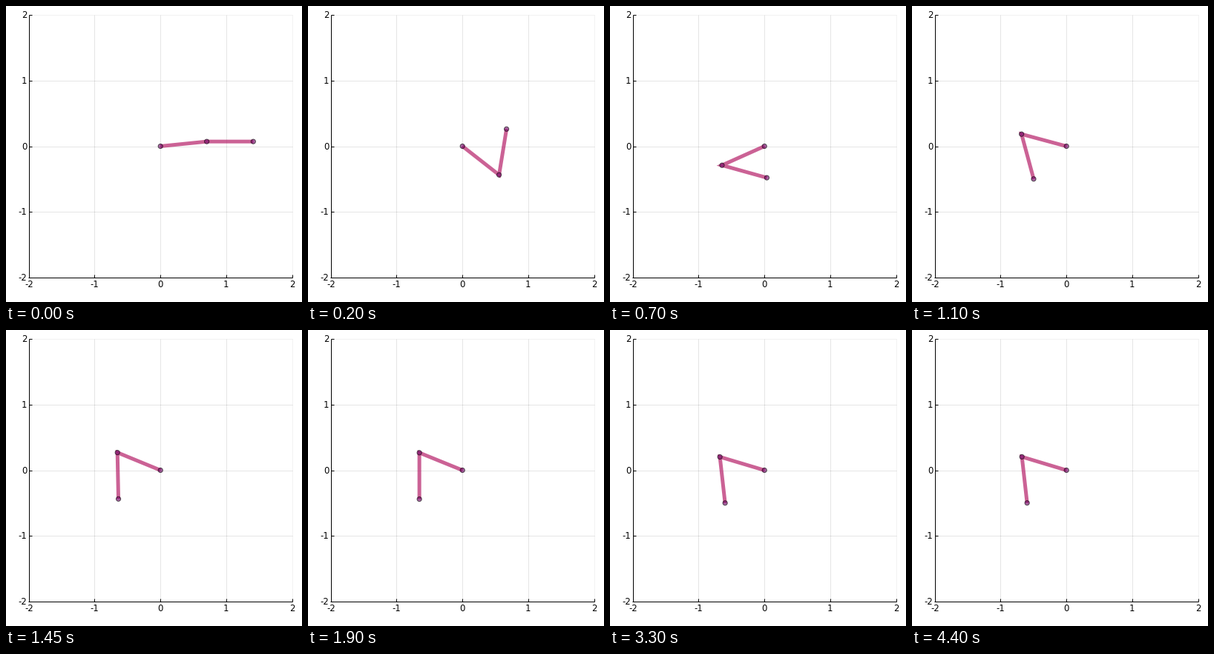
Animation, 399 px wide and 400 px high, one loop 4.55 s. Source, as a matplotlib script:

```python
import numpy as np
import matplotlib.pyplot as plt
from matplotlib.animation import FuncAnimation
from matplotlib.patches import Polygon, Circle

WIDTH, HEIGHT, DPI = 399, 400, 100
PX = 72 / DPI                      # one pixel in points
FRAMES, INTERVAL = 91, 50
ORIGIN = np.array([208.2, 189.5])
UNIT = 88.7                        # pixels per data unit
LINK = UNIT / np.sqrt(2)
LINE_WIDTH = 5.0
LEFT, RIGHT, TOP, BOTTOM = 30.8, 385.6, 12.0, 366.8

# Joint angles in degrees: swing, overshoot, then settle.
KEYS = np.array([0, 1, 2, 3, 4, 5, 6, 7, 8, 11, 14, 17, 20, 22,
                 26, 31, 38, 44, 50, 55, 66, 88], float)
SHOULDER = np.array([5.8, 1.5, -8.5, -22.5, -38.1, -52.1, -65.1, -77.6,
                     -89.6, -124, -155.8, -179.6, -191.6, -195.1, -200.3,
                     -203.1, -202.15, -200.3, -198.15, -197.3, -196.7, -196.8])
ELBOW = np.array([-5.8, 5.5, 36.5, 78.5, 118.9, 141, 152, 156.5,
                  157, 152.4, 140.2, 131, 124, 120.2, 115.4,
                  112.9, 112.15, 112.2, 112.55, 112.8, 113.1, 113.2])


def hermite(t, values):
    """Smooth cubic interpolation through the keyed values."""
    t = min(t, KEYS[-1])
    i = min(np.searchsorted(KEYS, t, side="right") - 1, len(KEYS) - 2)
    slopes = np.gradient(values, KEYS)
    h = KEYS[i + 1] - KEYS[i]
    u = (t - KEYS[i]) / h
    return ((1 + 2 * u) * (1 - u) ** 2 * values[i]
            + u * (1 - u) ** 2 * h * slopes[i]
            + u * u * (3 - 2 * u) * values[i + 1]
            + u * u * (u - 1) * h * slopes[i + 1])


def direction(degrees):
    a = np.radians(degrees)
    return np.array([np.cos(a), -np.sin(a)])


def normal(v):
    return np.array([-v[1], v[0]])


def arm_pose(frame):
    """Joint positions and the mitred outline of the two links."""
    shoulder = hermite(frame, SHOULDER)
    d1 = direction(shoulder)
    d2 = direction(shoulder + hermite(frame, ELBOW))
    elbow = ORIGIN + LINK * d1
    tip = elbow + LINK * d2
    n1, n2 = normal(d1), normal(d2)
    half = LINE_WIDTH / 2
    mitre = half * (n1 + n2) / (1 + n1 @ n2)
    n1, n2 = half * n1, half * n2
    outline = [ORIGIN + n1, elbow + mitre, tip + n2,
               tip - n2, elbow - mitre, ORIGIN - n1]
    return (ORIGIN, elbow, tip), np.array(outline)


fig = plt.figure(figsize=(WIDTH / DPI, HEIGHT / DPI), dpi=DPI, facecolor="white")
ax = fig.add_axes([0, 0, 1, 1])
ax.set_xlim(0, WIDTH)
ax.set_ylim(HEIGHT, 0)
ax.axis("off")


def stroke(xs, ys, alpha=1.0, z=2):
    ax.plot(xs, ys, color="black", lw=PX, alpha=alpha, zorder=z,
            solid_capstyle="butt")


for value in range(-2, 3):
    x, y = ORIGIN[0] + UNIT * value, ORIGIN[1] - UNIT * value
    if value > -2:
        faint = 0.05 if value == 2 else 0.1
        stroke([x, x], [TOP, BOTTOM], faint, 1)
        stroke([LEFT, RIGHT], [y, y], faint, 1)
    stroke([x, x], [BOTTOM, BOTTOM - 4], z=5)
    stroke([LEFT, LEFT + 4], [y, y], z=5)
    style = dict(family="DejaVu Sans", fontsize=11.6 * PX, color="black")
    ax.text(x, 380.3, str(value), ha="center", va="baseline", **style)
    ax.text(28.2, y + 4.3, str(value), ha="right", va="baseline", **style)

stroke([LEFT, LEFT], [TOP, BOTTOM + 0.5], z=5)
stroke([LEFT - 0.5, RIGHT], [BOTTOM, BOTTOM], z=5)

joints, outline = arm_pose(0)
arm = ax.add_patch(Polygon(outline, closed=True, lw=0, zorder=3,
                           facecolor=(0.714, 0.12, 0.412, 0.7)))
dots = [ax.add_patch(Circle(p, 3.1, lw=PX, zorder=4,
                            facecolor=(0.43, 0, 0.39, 0.6),
                            edgecolor=(0, 0, 0, 0.6)))
        for p in joints]


def update(frame):
    joints, outline = arm_pose(frame)
    arm.set_xy(outline)
    for dot, point in zip(dots, joints):
        dot.center = tuple(point)
    return [arm, *dots]


animation = FuncAnimation(fig, update, frames=FRAMES, interval=INTERVAL,
                          repeat=True, repeat_delay=0, blit=False)
plt.show()
```
